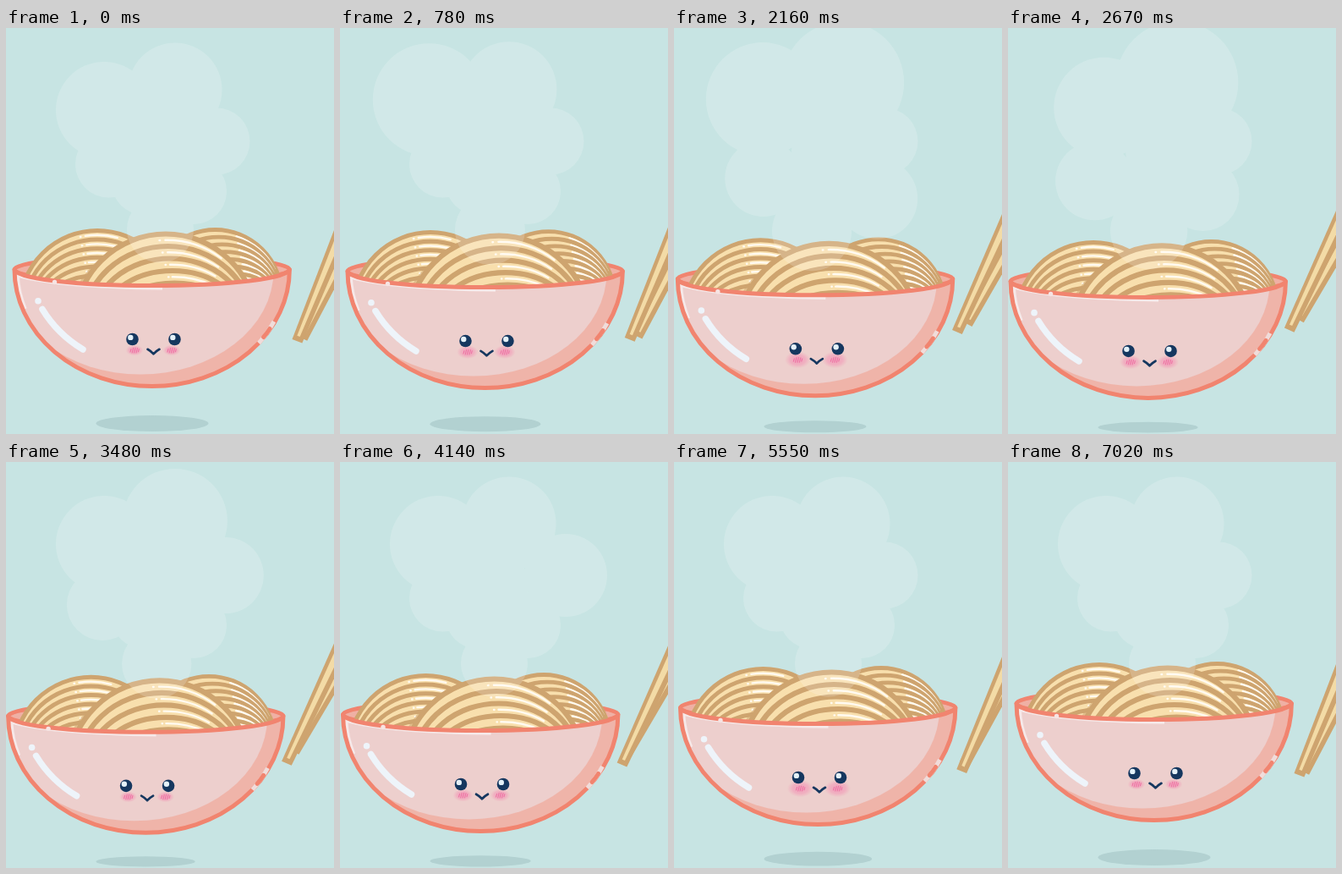
Animation, 388 px wide and 480 px high, one loop 7.05 s. Source, as an HTML page:

```html
<!DOCTYPE html>
<html lang="en">
<head>
<meta charset="utf-8">
<title>Noodle bowl</title>
<style>
  html, body { margin: 0; width: 100%; height: 100%; overflow: hidden; background: #c7e4e3; }
  svg { display: block; width: 388px; height: 480px; }
</style>
</head>
<body>
<svg viewBox="0 0 388 480">
  <defs>
    <clipPath id="above"><path d="M10 285.5A162.7 19 0 0 0 335.4 285.5V0H10Z"/></clipPath>
    <clipPath id="inside"><path d="M10 285.5A162.7 19 0 0 0 335.4 285.5A162.7 138 0 0 1 10 285.5Z"/></clipPath>
    <radialGradient id="blush">
      <stop offset="0" stop-color="#f394b6" stop-opacity=".8"/>
      <stop offset=".6" stop-color="#f29bb8" stop-opacity=".6"/>
      <stop offset="1" stop-color="#f0a5b8" stop-opacity="0"/>
    </radialGradient>
    <g id="stick">
      <path fill="#cea46f" d="M0 0H12.7L21 -220H0Z"/>
      <path fill="#f3dba6" d="M4 -6H7.5L14.5 -220H5Z"/>
    </g>
    <g id="eye">
      <circle r="7.3" fill="#15375f"/>
      <circle cx="-2.2" cy="-2.1" r="3.2" fill="#e4f1f8"/>
    </g>
    <path id="hatch" d="M-5 2L-4 -1.5M-2.8 3L-1.3 -2.7M-.4 3L1.1 -2.8M2 3L3.5 -2.5M4.5 1.8L5.3 -1.3"
      fill="none" stroke="#ee6ea2" stroke-linecap="round"/>
  </defs>

  <ellipse id="shadow" fill="#b2d1d1"/>

  <g id="bowl">
    <ellipse cx="172.7" cy="285.5" rx="162.7" ry="16" fill="#efb0a4" stroke="#f1846f" stroke-width="5"/>
    <g id="noodles" clip-path="url(#above)"></g>
    <g clip-path="url(#inside)">
      <rect y="280" width="345" height="150" fill="#efb4a9"/>
      <ellipse cx="159" cy="287" rx="157.5" ry="122.5" fill="#edcfcd"/>
      <path d="M23 332Q15 312 14 293Q60 306 185 308" fill="none" stroke="#f6e9e9" stroke-width="3.5"/>
    </g>
    <g fill="none" stroke="#f1846f" stroke-width="5" stroke-linejoin="round">
      <path d="M10 285.5A162.7 19 0 0 0 335.4 285.5A162.7 138 0 0 1 10 285.5Z"/>
      <path d="M317 347Q310 360 299 372.5" stroke="#f0dcda"/>
      <path d="M312 355.5Q308.5 361 304.5 365.5" stroke-linecap="round"/>
    </g>
    <circle cx="57.5" cy="300.5" r="2.7" fill="#f6e4e3"/>
    <circle cx="38" cy="322.7" r="3.8" fill="#eef4fa"/>
    <path d="M43 332.5Q61 362 91 380" fill="none" stroke="#eef4fa" stroke-width="7.5" stroke-linecap="round"/>
    <ellipse class="blush" cx="152" cy="381" fill="url(#blush)"/>
    <ellipse class="blush" cx="196" cy="381" fill="url(#blush)"/>
    <use href="#hatch" x="152" y="381"/>
    <use href="#hatch" x="196" y="381"/>
    <use href="#eye" x="149.5" y="368"/>
    <use href="#eye" x="199.5" y="368"/>
    <path d="M167.5 379.8Q171.5 382 174.5 385.3Q177.5 382 181.5 379.8" fill="none"
      stroke="#15375f" stroke-width="2.7" stroke-linecap="round" stroke-linejoin="round"/>
  </g>

  <g id="steam" fill="#fff" opacity=".18">
    <circle cx="163" cy="183" r="38"/>
    <circle cx="181" cy="145" r="42"/>
  </g>

  <g id="sticks">
    <use id="back" href="#stick"/>
    <use href="#stick"/>
  </g>
</svg>
<script>
const LOOP = 7050;
const $ = id => document.getElementById(id);
const set = (el, attrs) => { for (const k in attrs) el.setAttribute(k, attrs[k]); };
const mix = (a, b, k) => a + (b - a) * k;
const wave = x => (1 - Math.cos(Math.PI * x)) / 2;

// Eased rise from start to peak, then eased fall to end.
function pulse(t, start, peak, end) {
  if (t <= start || t >= end) return 0;
  return wave(t < peak ? (t - start) / (peak - start) : (end - t) / (end - peak));
}

// A mound of nested strands with a gleam in each gap.
function mound({ cx, cy, rx, ry, count, stepX, stepY, shift, width, gleam, shade = 0 }) {
  const ring = (k, style) => `<ellipse cx="${cx + shift * k}" cy="${cy}" rx="${rx - stepX * k}" ry="${ry - stepY * k}" ${style}/>`;
  let out = ring(0, `fill="#cea46f" opacity="${shade}" transform="translate(-9 4)"`);
  out += ring(0, 'fill="#f8dfad"');
  for (let i = 0; i < count; i++) {
    out += ring(i, `fill="none" stroke="#cea46f" stroke-width="${width}"`);
    out += ring(i + .5, `fill="none" stroke="#fffaf0" stroke-width="2.4" stroke-linecap="round" pathLength="100" stroke-dasharray="${gleam}"`);
  }
  return out;
}

$('noodles').innerHTML = [
  { cx: 247.5, cy: 317, rx: 78.5, ry: 78.5, count: 7, stepX: 6, stepY: 8.7, shift: 4, width: 4.8, gleam: '0 80 13 100' },
  { cx: 108, cy: 331, rx: 91.5, ry: 91.5, count: 6, stepX: 6, stepY: 10.6, shift: 0, width: 5, gleam: '0 71.3 .1 1 7 100' },
  { cx: 189, cy: 351.5, rx: 108, ry: 108, count: 5, stepX: 7.5, stepY: 14.5, shift: 2.6, width: 6.2, gleam: '0 73.6 .1 1 11 100', shade: .55 }
].map(mound).join('');

// Each puff: resting x, y, r; swollen x, y, r; start, peak, end.
const puffs = [
  [116, 97, 57, 97, 75, 74, 0, 1450, 3050],
  [200, 73, 55.5, 200, 64, 73, 500, 2450, 4200],
  [249, 134, 39.5, 267, 134, 49, 2700, 4100, 5500],
  [121.5, 161, 39.5, 102.5, 181, 46.5, 950, 2600, 4140],
  [222, 193, 39, 241, 202, 48, 840, 2030, 3230],
  [182.5, 238, 39.5, 163, 240, 47, 100, 2100, 4100]
].map(spec => {
  const el = document.createElementNS('http://www.w3.org/2000/svg', 'circle');
  $('steam').append(el);
  return { el, spec };
});

const blushes = document.querySelectorAll('.blush');

function draw(now) {
  const t = now % LOOP;
  const sway = pulse(t, 0, 3225, LOOP);

  set($('bowl'), { transform: `translate(${-7.5 * sway} ${15 * sway})` });
  const rx = 66.5 - 8 * sway;
  set($('shadow'), { cx: 106.5 + rx, cy: 467.5 + 5 * sway, rx, ry: 9.5 - 3.4 * sway });

  const glow = wave(t / LOOP * 4);
  blushes.forEach(el => set(el, { rx: 10.5 + 5.5 * glow, ry: 6.5 + 4 * glow }));

  for (const { el, spec: [x, y, r, x2, y2, r2, ...times] } of puffs) {
    const k = pulse(t, ...times);
    set(el, { cx: mix(x, x2, k), cy: mix(y, y2, k), r: mix(r, r2, k) });
  }

  set($('sticks'), { transform: `translate(${338.5 - 12.5 * sway} ${368 - 14.5 * sway}) rotate(${21 + 3 * sway})` });
  const gap = Math.max(0, 3.5 + 4.5 * Math.cos((t - 1500) / LOOP * 2 * Math.PI));
  set($('back'), { transform: `translate(${gap} ${-5.7 - 11 * sway}) rotate(4.5)` });
}

function tick() {
  draw(performance.now());
  requestAnimationFrame(tick);
}
tick();
</script>
</body>
</html>
```
